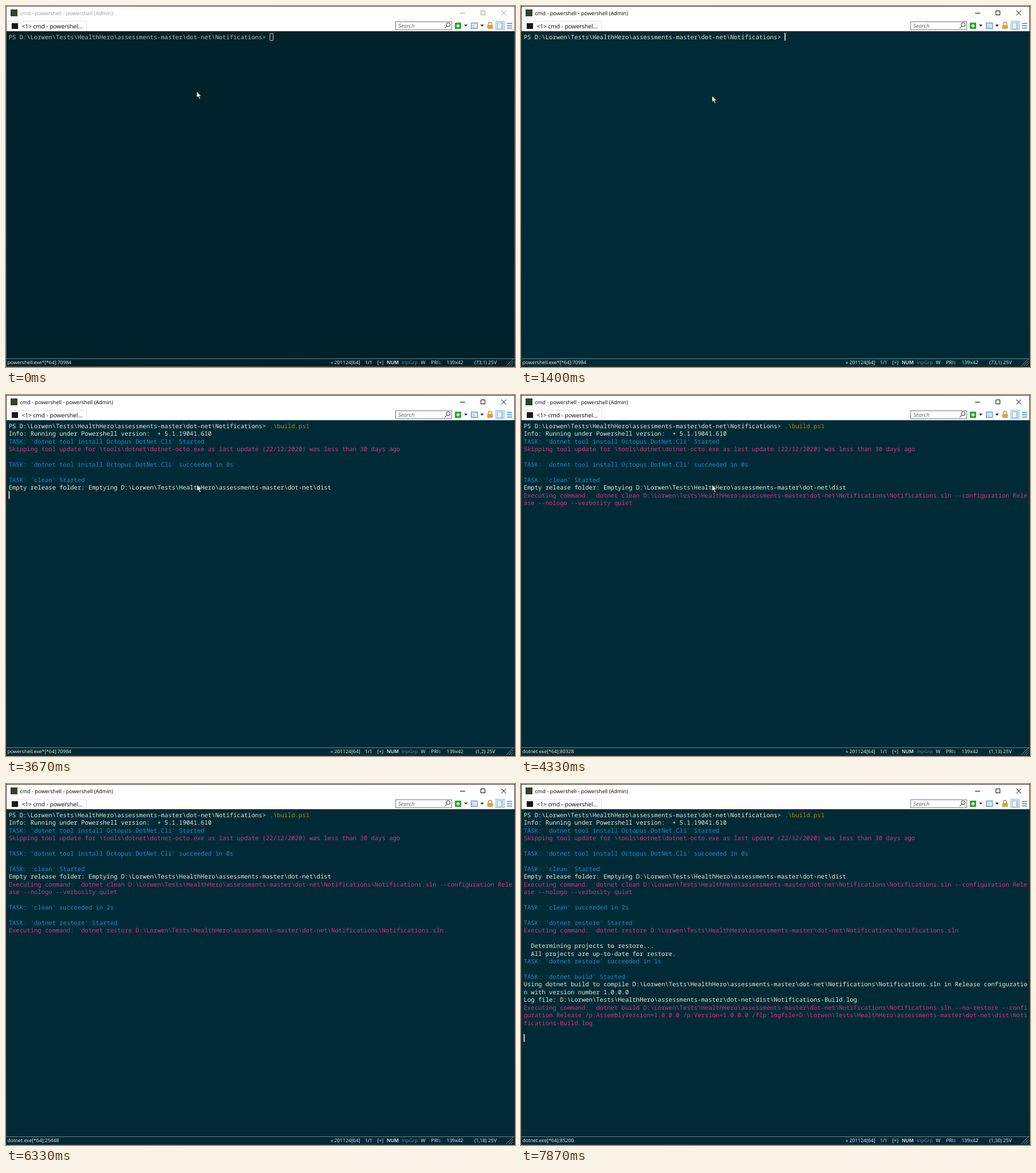
These frames come from a looping animation (889 px wide and 630 px high, 8000 ms). An HTML page:

```html
<!DOCTYPE html>
<html lang="en">
<head>
<meta charset="utf-8">
<title>Build console</title>
<style>
  html, body { margin: 0; width: 100%; height: 100%; overflow: hidden; background: #2b2523; }
  svg { display: block; width: 889px; height: 630px; }
  text { white-space: pre; text-rendering: geometricPrecision; font-family: "Open Sans", "Noto Sans", sans-serif; }
  #term text { font: 10.55px "Noto Sans Mono", "DejaVu Sans Mono", monospace; }
  #status text { font-size: 8.6px; fill: #f2f2ee; }
  #status .off { fill: #758b91; }
  #status .on { fill: #fff; font-weight: 600; }
</style>
</head>
<body>
<svg viewBox="0 0 889 630">
  <defs>
    <linearGradient id="edge" x2="1" y2="1">
      <stop offset="0" stop-color="#6b5245"/>
      <stop offset=".35" stop-color="#4a3d38"/>
      <stop offset=".65" stop-color="#7d6a60"/>
      <stop offset="1" stop-color="#57483f"/>
    </linearGradient>
  </defs>
  <rect width="889" height="630" fill="#1b1918"/>
  <rect id="backdrop" width="889" height="630" fill="url(#edge)"/>
  <rect x="1" y="1" width="887" height="43.500" fill="#fff"/>
  <rect x="1" y="44" width="887" height="585" fill="#002b36"/>

  <!-- title bar -->
  <rect x="8" y="6" width="12" height="12" fill="#34412b"/>
  <g id="caption">
    <text x="24.500" y="16" font-size="9.140" fill="currentColor">cmd - powershell - powershell (Admin)</text>
    <path d="M793 12.500h9M829.500 8.500h7v7h-7zM865 8l8.500 8.500M873.500 8l-8.500 8.500" fill="none" stroke="currentColor"/>
  </g>

  <!-- tab and toolbar -->
  <path d="M2.500 44V26.500H140.500V44" fill="none" stroke="#e2e2e2"/>
  <rect x="10" y="30" width="11" height="10" fill="#16181a"/>
  <text x="27.500" y="39.300" font-size="10.140">&lt;1&gt; cmd - powershel...</text>
  <rect x="680.500" y="27.500" width="98" height="14" fill="#fff" stroke="#777"/>
  <text x="685" y="38" font-size="9.600" font-style="italic" fill="#666">Search</text>
  <g fill="none" stroke="#444" stroke-width="1.100">
    <circle cx="772.300" cy="32.500" r="3.300"/>
    <path d="M770 35l-4 4.500"/>
  </g>
  <rect x="784" y="29" width="11" height="11" rx="1" fill="#28a52d"/>
  <path d="M786.500 34.500h6M789.500 31.500v6" stroke="#fff" stroke-width="1.800"/>
  <path d="M800 32.500h6l-3 3.500zM828.500 32.500h6l-3 3.500z" fill="#222"/>
  <rect x="812.500" y="29.500" width="11" height="10" fill="#b9d5f1" stroke="#5b90c9"/>
  <path d="M814.500 32h4M814.500 35h3M819.500 32v5h2v-5" fill="none" stroke="#fff"/>
  <path d="M842.500 33.500v-2a3 3 0 0 1 6 0v2" fill="none" stroke="#b98a3a" stroke-width="1.300"/>
  <rect x="840.500" y="33" width="10" height="7" rx="1" fill="#d7a548"/>
  <rect x="855.500" y="26.500" width="15" height="15" fill="#cfe7fa" stroke="#8cc6ef"/>
  <rect x="858.500" y="29.500" width="9" height="10" fill="#f4f8fb" stroke="#a3b3c2"/>
  <path d="M865.500 30v9" stroke="#a3b3c2" stroke-width="1.500"/>
  <path d="M875 30.500h9M875 34.500h9M875 38.500h9" stroke="#2b84d2" stroke-width="1.500"/>

  <g id="term"></g>
  <rect id="dim" x="1" y="44.500" width="887" height="584.500" opacity=".2"/>

  <path d="M1 615.500H888" stroke="#6d878d"/>
  <g id="status">
    <text id="process" x="2.500" y="625"></text>
    <text x="567" y="625">« 201124[64]</text>
    <text x="627" y="625">1/1</text>
    <text x="648.500" y="625">[+]</text>
    <text x="665" y="625" class="on">NUM</text>
    <text x="691" y="625" class="off">InpGrp</text>
    <text x="724.500" y="625">W</text>
    <text x="742.500" y="625">PRI↕</text>
    <text x="769.500" y="625">139x42</text>
    <text id="position" x="837.500" y="625" text-anchor="middle"></text>
  </g>
  <path d="M874 628l12-12M878 628l8-8M882 628l4-4" stroke="#8b9da1" stroke-width=".9"/>
  <rect id="box" x="461" y="48" width="5.500" height="12.500" rx="1" fill="none" stroke="#e8e8e4" stroke-width=".9"/>
  <rect id="bar" width="1.500" height="13.500" fill="#fff"/>
  <path id="mouse" d="M0 0V11L2.600 8.800L4.800 13.500L6.600 12.600L4.500 8.200H8Z" fill="#fff" stroke="#111" stroke-width=".8"/>
</svg>
<script>
const LOOP = 8000, COLS = 139, CELL = 6.33, ROW = 13.43, LEFT = 4.7, TOP = 47;
const WHITE = '#eee8d5', BLUE = '#268bd2', PINK = '#d33682', YELLOW = '#b58900';
const $ = id => document.getElementById(id);

const root = 'D:\\Lorwen\\Tests\\HealthHero\\assessments-master\\dot-net';
const sln = root + '\\Notifications\\Notifications.sln';
const log = root + '\\dist\\Notifications-Build.log';
const prompt = `PS ${root}\\Notifications> `;
const blank = [WHITE, ' '];
const run = cmd => [PINK, 'Executing command:  dotnet ' + cmd];
const task = (name, state) => [BLUE, `TASK: '${name}' ${state}`];
const tool = 'dotnet tool install Octopus.DotNet.Cli';

const output = [
  [WHITE, prompt],
  [WHITE, 'Info: Running under Powershell version:  + 5.1.19041.610'],
  task(tool, 'Started'),
  [PINK, 'Skipping tool update for \\tools\\dotnet\\dotnet-octo.exe as last update (22/12/2020) was less than 30 days ago'],
  blank,
  task(tool, 'succeeded in 0s'),
  blank,
  task('clean', 'Started'),
  [WHITE, `Empty release folder: Emptying ${root}\\dist`],
  run(`clean ${sln} --configuration Release --nologo --verbosity quiet`),
  blank,
  task('clean', 'succeeded in 2s'),
  blank,
  task('dotnet restore', 'Started'),
  run(`restore ${sln}`),
  blank,
  [WHITE, '  Determining projects to restore...'],
  [WHITE, '  All projects are up-to-date for restore.'],
  task('dotnet restore', 'succeeded in 1s'),
  blank,
  task('dotnet build', 'Started'),
  [WHITE, `Using dotnet build to compile ${sln} in Release configuration with version number 1.0.0.0`],
  [WHITE, `Log file: ${log}`],
  run(`build ${sln} --no-restore --configuration Release /p:AssemblyVersion=1.0.0.0 /p:Version=1.0.0.0 /flp:logfile=${log}`)
];

function addText(x, row, color, text) {
  const el = document.createElementNS('http://www.w3.org/2000/svg', 'text');
  el.setAttribute('x', x);
  el.setAttribute('y', TOP + 11 + (row - 1) * ROW);
  el.setAttribute('fill', color);
  el.textContent = text;
  $('term').append(el);
  return el;
}

const wrap = new RegExp(`.{1,${COLS}}`, 'g');
const rows = output
  .flatMap(([color, text]) => text.match(wrap).map(part => [color, part]))
  .map(([color, text], i) => addText(LEFT, i + 1, color, text));
const command = addText(LEFT + prompt.length * CELL, 1, YELLOW, '');

// Each track lists [start time, value]; a value holds until the next start.
const at = (track, t) => track.findLast(([start]) => start <= t)[1];

const dotnet = pid => `dotnet.exe[*64]:${pid}`;
const typed = [[0, ''], [1600, 'b'], [1800, 'bu'], [1910, 'bui'], [2020, 'buil'], [2130, 'build'], [2530, '.\\build.ps1']];
const shown = [[0, 1], [3670, 9], [3730, 11], [5800, 16], [7200, 18], [7600, 19], [7670, 25], [7730, 28]];
const caretRow = [[0, 1], [3400, 2], [3670, 10], [3730, 13], [5800, 18], [7200, 19], [7600, 20], [7670, 26], [7730, 30]];
const caretOn = [[0, false], [400, true], [870, false], [1400, true], [3070, false], [3400, true],
  [4270, false], [4800, true], [5330, false], [5800, true], [6330, false], [6870, true]];
const process = [[0, 'powershell.exe*[*64]:70984'], [3800, dotnet(71636)], [4330, dotnet(80328)],
  [6330, dotnet(25448)], [7870, dotnet(85200)]];
const statusRow = [[3400, 2], [3800, 13], [5800, 18], [7200, 19], [7870, 30]];

const show = (el, on) => el.setAttribute('visibility', on ? 'visible' : 'hidden');
const place = (el, x, y) => el.setAttribute('transform', `translate(${x} ${y})`);

function mousePos(t) {
  if (t < 70) return [333, 149];
  const k = t < 4470 ? 0 : (Math.floor((t - 4470) / 66) + 1) / 5;
  return [333.7 + 525 * k, 156.7 + 92 * k];
}

function draw(t) {
  const active = t >= 400, text = at(typed, t), row = at(caretRow, t);
  $('caption').style.color = active ? '#000' : '#999';
  $('backdrop').setAttribute('opacity', active ? 0.4 : 1);
  show($('dim'), !active);
  show($('box'), !active);

  command.textContent = text;
  rows.forEach((el, i) => show(el, i < at(shown, t)));

  const col = prompt.length + text.length;
  place($('bar'), row === 1 ? LEFT + col * CELL : LEFT, TOP + (row - 1) * ROW);
  show($('bar'), at(caretOn, t));

  $('process').textContent = at(process, t);
  // The status column catches up late after completion.
  const statusCol = t >= 2530 && t < 2670 ? 78 : col + 1;
  $('position').textContent = t < 3400 ? `(${statusCol},1) 25V` : `(1,${at(statusRow, t)}) 25V`;

  place($('mouse'), ...mousePos(t));
  show($('mouse'), t < 4800);
}

const start = performance.now();
function tick() {
  draw((performance.now() - start) % LOOP);
  requestAnimationFrame(tick);
}
tick();
</script>
</body>
</html>
```
